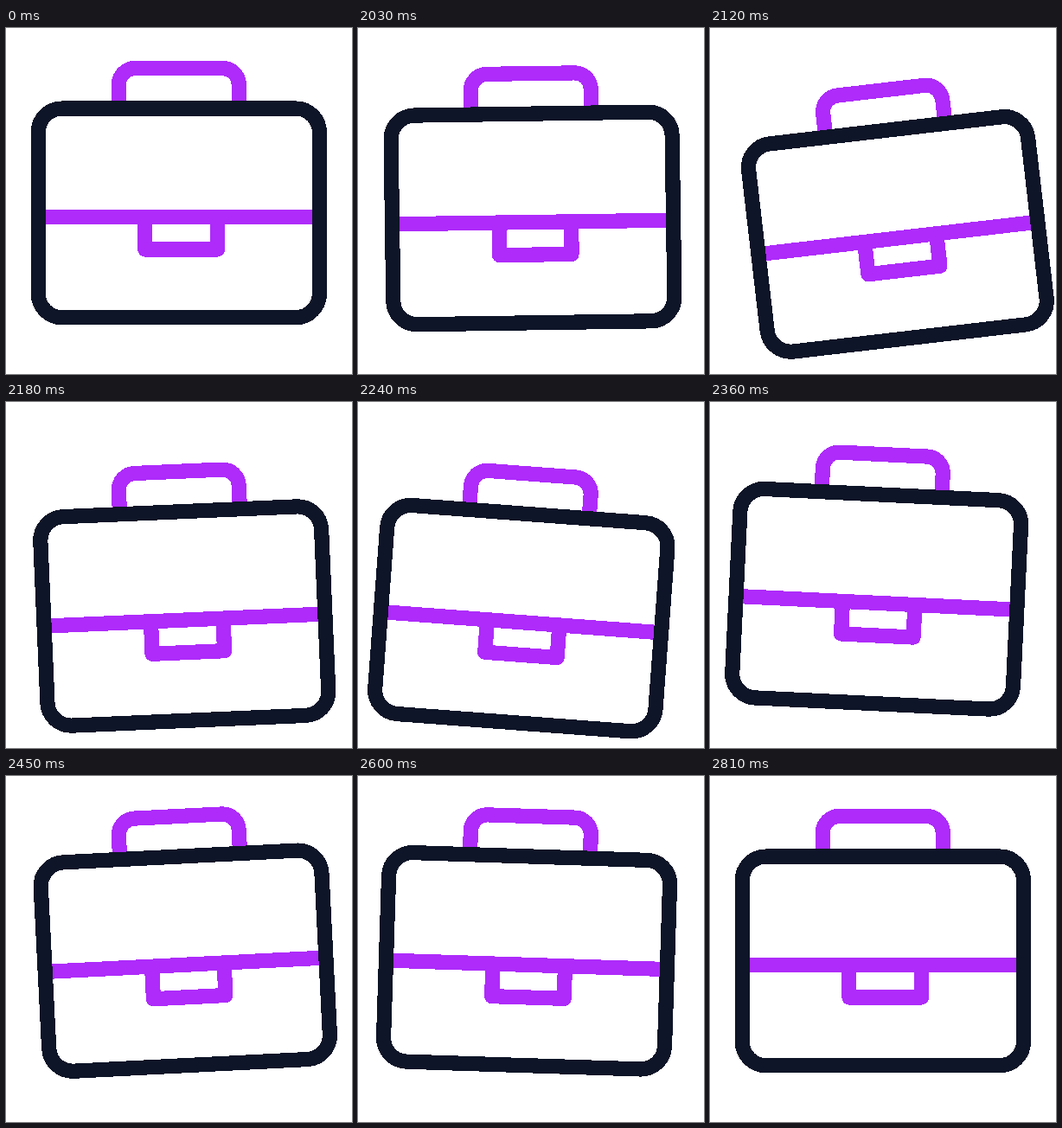
Recreate the animation shown at these times as an HTML page. Size 400 px wide and 400 px high, loop 2.84 s.

```html
<!DOCTYPE html>
<html lang="en">
<head>
<meta charset="utf-8">
<title>Swinging briefcase</title>
<style>
  html, body { margin: 0; width: 100%; height: 100%; overflow: hidden; background: #fff; }
  svg { display: block; width: 100%; height: 100%; }
  #case { fill: none; stroke-width: 17.2; stroke-linejoin: round; shape-rendering: crispEdges; }
  .accent { stroke: #ae2bfa; }
  .shell { stroke: #0e1528; }
</style>
</head>
<body>
<svg viewBox="0 0 400 400">
  <g id="case">
    <g class="accent">
      <path d="M130.300 90V65.500a19 19 0 0 1 19-19h101a19 19 0 0 1 19 19V90"/>
      <path d="M40 218.400H360"/>
      <path d="M160.800 218.400V256H244.400V218.400"/>
    </g>
    <rect class="shell" x="37.300" y="93" width="325.100" height="241.700" rx="27.500"/>
  </g>
</svg>
<script>
  const LOOP = 2840, START = 2030, STEP = 30;
  const PIVOT = '200 66';

  // [time in ms, degrees]: a swing that dies away
  const SWING = [
    [2005, 0], [2114, -6.65], [2289, 6.7], [2450, -2.9],
    [2575, 2.15], [2700, -0.95], [2820, 0]
  ];
  const DROP = { from: 2005, peak: 2240, to: 2449, depth: 36.7 };

  const clamp = u => Math.min(1, Math.max(0, u));
  const part = (t, a, b) => clamp((t - a) / (b - a));
  const easeInOut = u => (1 - Math.cos(Math.PI * u)) / 2;
  const easeOut = u => Math.sin(Math.PI / 2 * u);

  function angleAt(t) {
    let angle = 0;
    for (let i = 1; i < SWING.length; i++) {
      const [t0, a0] = SWING[i - 1], [t1, a1] = SWING[i];
      angle += (a1 - a0) * easeInOut(part(t, t0, t1));
    }
    return angle;
  }

  function dropAt(t) {
    const { from, peak, to, depth } = DROP;
    return depth * (easeOut(part(t, from, peak)) - easeInOut(part(t, peak, to)));
  }

  const bag = document.getElementById('case');

  function draw() {
    const now = performance.now() % LOOP;
    // rest first, then move in even steps
    const t = now < START ? 0 : START + Math.floor((now - START) / STEP) * STEP;
    bag.setAttribute('transform',
      `translate(0 ${dropAt(t).toFixed(3)}) rotate(${angleAt(t).toFixed(3)} ${PIVOT})`);
    requestAnimationFrame(draw);
  }
  draw();
</script>
</body>
</html>
```
